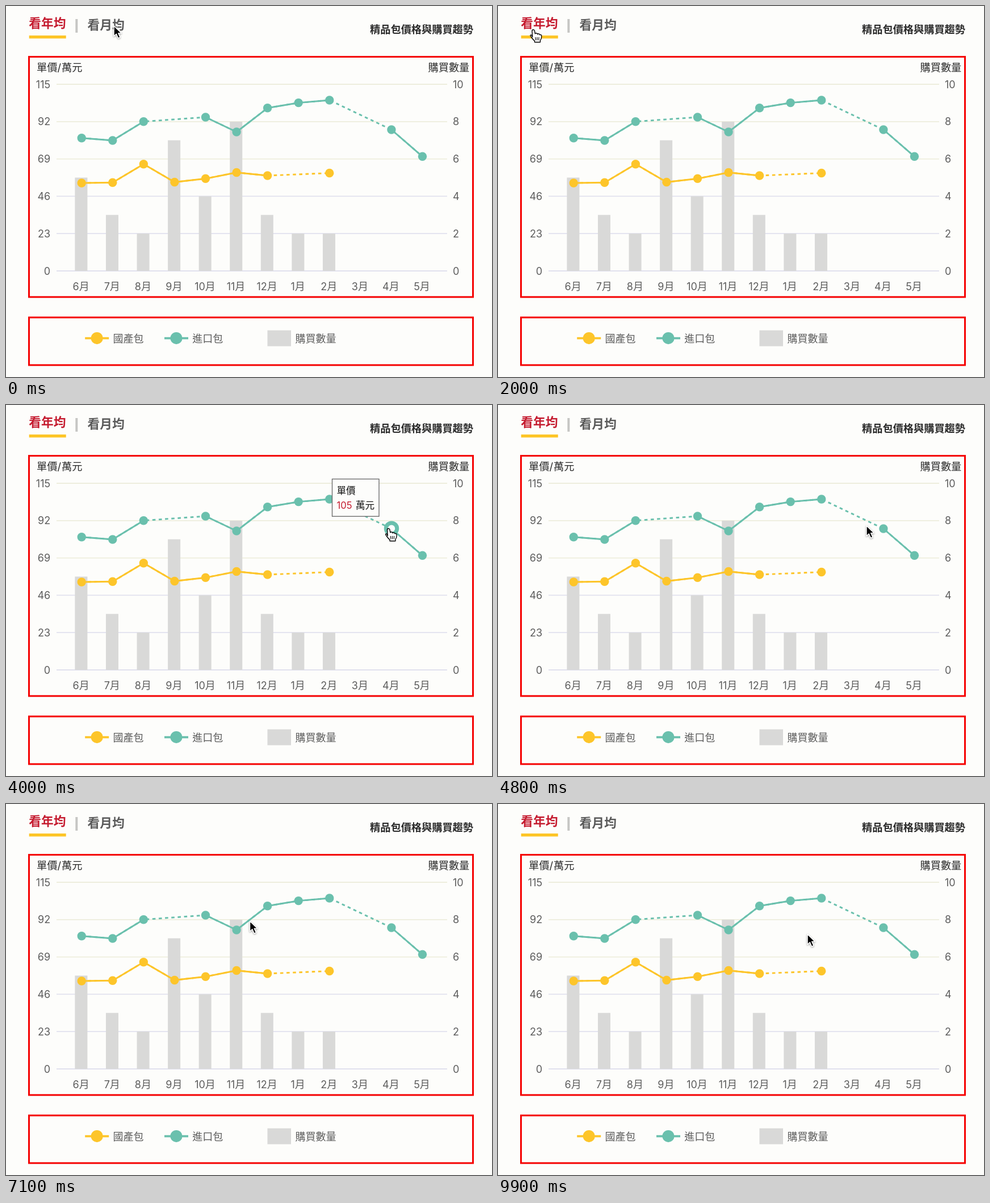
Animation of 856x654 px, one loop 10 s. Source, as an HTML page:

```html
<!DOCTYPE html>
<html lang="zh-Hant">
<head>
<meta charset="utf-8">
<style>
  html, body { margin: 0; width: 100%; height: 100%; overflow: hidden; background: #fdfdfb; }
  svg { display: block; width: 856px; height: 654px; }
  text { font: 18px Inter, "Noto Sans CJK TC", "Noto Sans CJK", sans-serif; fill: #5c5c5c; }
  .label { fill: #2b2b2b; font-size: 18.2px; }
  .title { fill: #2b2b2b; font-size: 18.2px; font-weight: 700; }
  .tab { font-size: 21.7px; font-weight: 700; fill: #5a5a5a; }
  .tab.on { fill: #c51c30; }
  .tip text { font-size: 16.6px; fill: #111; }
  .end { text-anchor: end; }
  .mid { text-anchor: middle; }
  .frame { fill: none; stroke: #f50000; stroke-width: 3; }
</style>
</head>
<body>
<svg viewBox="0 0 856 654">
  <rect width="856" height="654" fill="#fdfdfb"/>
  <rect id="underline" y="52" width="65" height="5.3" fill="#fdc527"/>
  <text id="yearTab" class="tab" x="40.3">看年均</text>
  <text id="monthTab" class="tab" x="143.5">看月均</text>
  <rect x="122.3" y="23" width="4" height="24" fill="#c6c6c4"/>
  <text class="title end" x="823" y="47.5">精品包價格與購買趨勢</text>
  <text class="label" x="54" y="114.7">單價/<tspan dx="1">萬元</tspan></text>
  <text class="label end" x="816.3" y="114.7">購買數量</text>
  <g id="axes"></g>
  <g id="yearChart"></g>
  <g id="monthChart"></g>
  <rect class="frame" x="40.5" y="89.5" width="782" height="423.5"/>
  <rect class="frame" x="40.5" y="549" width="782" height="84"/>
  <g id="legend"></g>
  <g id="hover">
    <circle cx="679" cy="217.7" r="9.7" fill="#fff" stroke="#6ac0ad" stroke-width="7"/>
    <g class="tip">
      <rect x="574.5" y="130.5" width="82.5" height="65.8" fill="#fdfdfb" stroke="#666" stroke-width="1.3"/>
      <text x="582.5" y="157">單價</text>
      <text x="582.5" y="182.6" style="fill:#c51c30">105</text>
      <text x="616" y="182.6">萬元</text>
    </g>
  </g>
  <g id="cursor">
    <path id="arrow" d="M0 0V18.3L4.3 14.3L7.6 21.8L11 20.3L7.8 13H13.4Z" fill="#000" stroke="#fff"
      stroke-width="1.5" stroke-linejoin="round" style="filter:drop-shadow(0 1.5px 1.5px #0006)"/>
    <g id="hand" stroke="#000" stroke-width="1.4" stroke-linejoin="round" stroke-linecap="round">
      <path fill="#fff" d="M-2.3 13.6L-3 3Q-3 .8 -.9 .8Q1.1 .8 1.5 2.8L2.4 7.8Q3.3 6.6 5 7Q6.3 7.4 6.5 8.7Q7.8 7.5 9.3 8.2Q10.3 8.8 10.5 9.9Q12 9 13.1 10.1Q14 11 13.6 14.3Q13.3 17.6 11.4 19.7V22.8H1.5V20.6Q-1.5 18 -3.5 15Q-5.9 12.2 -6 11Q-5.7 9.5 -3.9 10.3Z"/>
      <path fill="none" stroke-width="1.1" d="M3 14.3L3.3 19M6 14.3V19M9 14.3L8.8 19"/>
    </g>
    <g id="beam" fill="none" stroke-linecap="round">
      <path d="M-4.5 -11Q0 -11 0 -8Q0 -11 4.5 -11M0 -8V8M-4.5 11Q0 11 0 8Q0 11 4.5 11M-2 3.5H2" stroke="#fff" stroke-width="4"/>
      <path d="M-4.5 -11Q0 -11 0 -8Q0 -11 4.5 -11M0 -8V8M-4.5 11Q0 11 0 8Q0 11 4.5 11M-2 3.5H2" stroke="#222" stroke-width="1.7"/>
    </g>
  </g>
</svg>
<script>
const LOOP = 10000, STEP = 100;
const GOLD = '#fdc52a', TEAL = '#6ac0ad', GREY = '#d9d9d8';
const BASE = 467, UNIT = 32.9;
const $ = id => document.getElementById(id);
const pointX = i => 133.2 + 54.57 * i;

const line = (x1, y1, x2, y2, color, width) =>
  `<line x1="${x1}" y1="${y1}" x2="${x2}" y2="${y2}" stroke="${color}" stroke-width="${width}"/>`;
const dot = (x, y, r, color) => `<circle cx="${x}" cy="${y}" r="${r}" fill="${color}"/>`;
const rect = (x, y, w, h) => `<rect x="${x}" y="${y}" width="${w}" height="${h}" fill="${GREY}"/>`;
const text = (x, y, s, cls = '') => `<text x="${x}" y="${y}" class="${cls}">${s}</text>`;

function axes() {
  let out = '';
  for (let i = 0; i <= 5; i++) {
    const y = BASE - i * UNIT * 2;
    out += line(89, y, 777, y, i > 2 ? '#eeeedd' : '#e1e1ee', 1.8);
    out += text(78.2, y + 6.5, i * 23, 'end') + text(787, y + 6.5, i * 2);
  }
  for (let i = 0; i < 12; i++) out += text(pointX(i) - 1, 501, `${(i + 5) % 12 + 1}月`, 'mid');
  return out;
}

// One dashed line runs through all known points; solid segments cover it except across gaps (0).
function series(ys, color) {
  const known = ys.map((y, i) => ({ i, x: pointX(i), y })).filter(p => p.y);
  const dashed = `<polyline points="${known.map(p => `${p.x},${p.y}`).join(' ')}" fill="none"
    stroke="${color}" stroke-width="2.9" stroke-dasharray="5.59"/>`;
  const solid = known.slice(1).map((p, k) => {
    const q = known[k];
    return p.i - q.i === 1 ? line(q.x, q.y, p.x, p.y, color, 2.9) : '';
  });
  return dashed + solid.join('') + known.map(p => dot(p.x, p.y, 7.7, color)).join('');
}

const chart = ({ bars, gold, teal }) =>
  bars.map((n, i) => rect(pointX(i) - 11.8, BASE - n * UNIT, 22, n * UNIT)).join('') +
  series(gold, GOLD) + series(teal, TEAL);

const legendKey = (x, color, label) =>
  line(x - 21, 585.6, x + 21, 585.6, color, 3.8) + dot(x, 585.6, 10.6, color) + text(x + 28.3, 592.5, label);

const yearly = {
  bars: [5, 3, 2, 7, 4, 8, 3, 2, 2, 0, 0, 0],
  gold: [312, 311.3, 278.7, 310.5, 304.3, 293.5, 299, 0, 294.5],
  teal: [232.7, 237, 203.7, 0, 196, 222, 179.8, 170.6, 166, 0, 218, 265.3]
};
const monthly = {
  bars: [4, 2, 1, 4, 2, 2, 3, 1, 1, 0, 2, 3],
  gold: [255, 282.7, 244, 266, 218.5, 293.5, 286, 0, 299],
  teal: [290, 265.7, 0, 318, 294.5, 194.5, 179.8, 170.6, 218, 0, 166, 294]
};

$('axes').innerHTML = axes();
$('yearChart').innerHTML = chart(yearly);
$('monthChart').innerHTML = chart(monthly);
$('legend').innerHTML =
  legendKey(160.2, GOLD, '國產包') + legendKey(300, TEAL, '進口包') +
  rect(460.5, 571.7, 41.5, 28) + text(509.5, 592.5, '購買數量');

// time, x, y, pointer shape from that time on
const path = [
  [0, 190, 35, 'arrow'], [300, 168, 41, 'hand'], [600, 159, 42.5, 'hand'], [1300, 159, 42.5, 'hand'],
  [1500, 115, 43, 'arrow'], [1700, 64, 41, 'hand'], [2300, 62, 41, 'hand'],
  [2600, 116, 41, 'beam'], [2700, 120, 41, 'beam'], [2800, 135, 50, 'arrow'],
  [3600, 674.5, 217, 'hand'], [4500, 674.5, 217, 'hand'], [4700, 655, 214, 'arrow'],
  [5600, 478.5, 176.5, 'arrow'], [6300, 478.5, 176.5, 'arrow'], [7000, 429.5, 206.5, 'arrow'],
  [7800, 429.5, 206.5, 'arrow'], [9300, 545, 229.5, 'arrow'], [LOOP, 545, 229.5, 'arrow']
];

function pointerAt(t) {
  const k = path.findIndex(p => p[0] > t);
  const [t0, x0, y0, shape] = path[k - 1], [t1, x1, y1] = path[k];
  const u = (t - t0) / (t1 - t0), e = u * u * (3 - 2 * u);
  return { x: x0 + (x1 - x0) * e, y: y0 + (y1 - y0) * e, shape };
}

const show = (id, on) => { $(id).style.display = on ? '' : 'none'; };

function setTab(id, on) {
  $(id).setAttribute('class', on ? 'tab on' : 'tab');
  $(id).setAttribute('y', on ? 38 : 41);
}

function render(t) {
  const byMonth = t >= 400 && t < 1900;
  setTab('yearTab', !byMonth);
  setTab('monthTab', byMonth);
  $('underline').setAttribute('x', byMonth ? 143.5 : 40.7);
  show('yearChart', !byMonth);
  show('monthChart', byMonth);
  show('hover', t >= 3600 && t < 4700);
  const { x, y, shape } = pointerAt(t);
  $('cursor').setAttribute('transform', `translate(${x} ${y})`);
  for (const id of ['arrow', 'hand', 'beam']) show(id, id === shape);
}

const start = performance.now();
function tick() {
  const t = (performance.now() - start) % LOOP;
  render(Math.floor(t / STEP) * STEP);
  requestAnimationFrame(tick);
}
tick();
</script>
</body>
</html>
```
